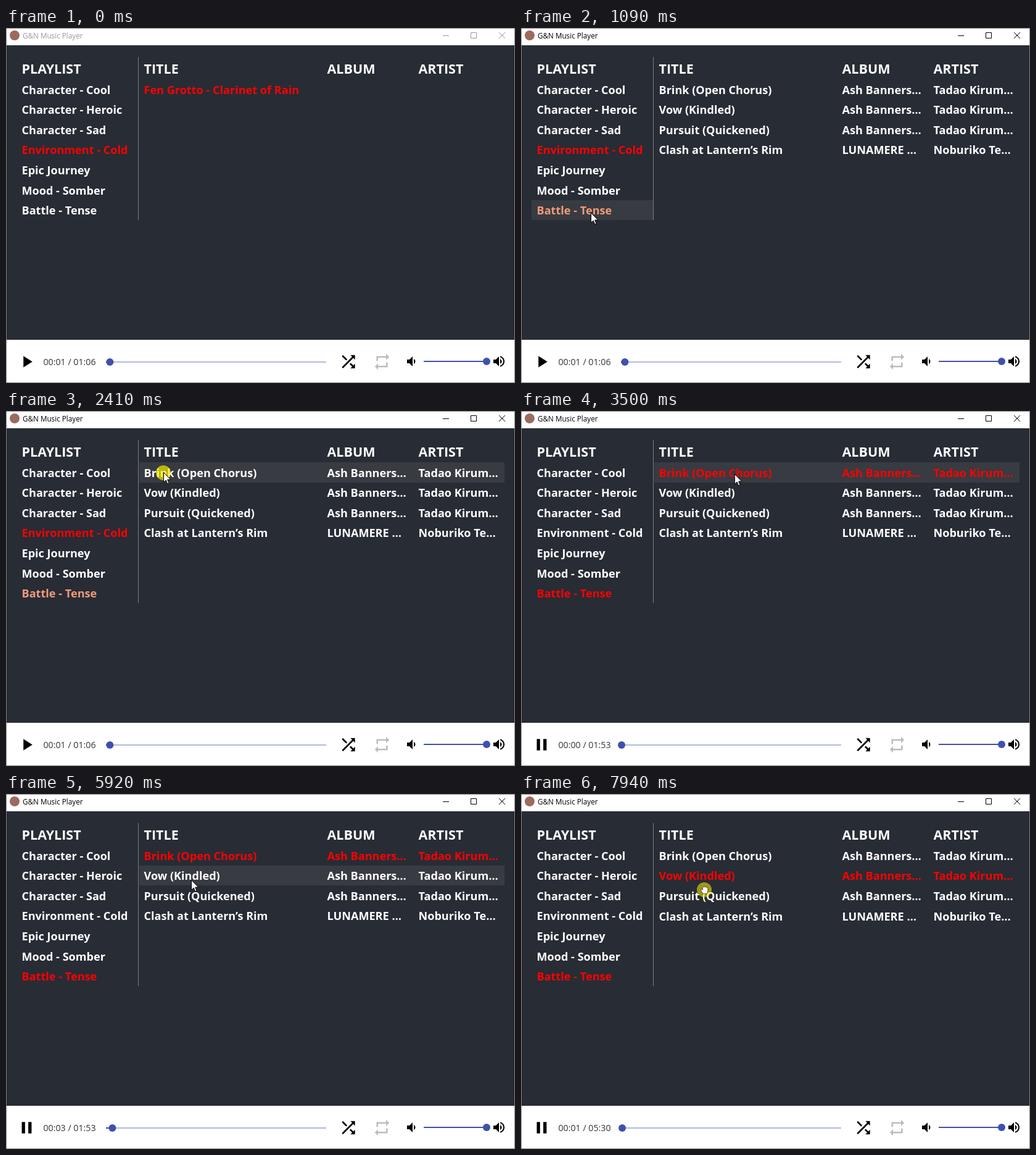
These frames come from a looping animation (825x575 px, 8000 ms). An HTML page with a canvas:

```html
<!DOCTYPE html>
<html lang="en">
<head>
<meta charset="utf-8">
<title>Music Player</title>
<style>
  html, body { margin: 0; width: 100%; height: 100%; overflow: hidden; background: #fff; }
  canvas { display: block; }
</style>
</head>
<body>
<canvas id="stage" width="825" height="575"></canvas>
<script>
const ctx = document.getElementById('stage').getContext('2d');
const LOOP = 8000;
const ACCENT = '#3f50ad';
const FAMILY = '"Open Sans", "Noto Sans", sans-serif';
const ROW_TOP = 83.2, ROW_HEIGHT = 32.6;

// Moments at which the interface changes
const FOCUS = 1010, OPEN_LIST = 1090, PLAY = 2560, NEXT_SONG = 6070, GRAB = 7940;

const playlists = ['Character - Cool', 'Character - Heroic', 'Character - Sad',
  'Environment - Cold', 'Epic Journey', 'Mood - Somber', 'Battle - Tense'];
const coldSongs = [['Fen Grotto - Clarinet of Rain', '', '']];
const battleSongs = [
  ['Brink (Open Chorus)', 'Ash Banners…', 'Tadao Kirum…'],
  ['Vow (Kindled)', 'Ash Banners…', 'Tadao Kirum…'],
  ['Pursuit (Quickened)', 'Ash Banners…', 'Tadao Kirum…'],
  ['Clash at Lantern’s Rim', 'LUNAMERE …', 'Noburiko Te…'],
];
const columns = [223.5, 520.5, 668.5];

// Pointer moves: start, end, number of steps, waypoints
const moves = [
  [170, 930, 11, [[820, 690], [430, 420], [110, 310], [38, 293], [80, 300], [113, 299]]],
  [1940, 2410, 7, [[113, 299], [150, 240], [235, 120], [255, 99]]],
  [3420, 4200, 11, [[255, 99], [380, 103], [640, 110], [755, 150], [762, 205]]],
  [4290, 4370, 2, [[762, 205], [560, 243], [301, 182]]],
  [4450, 4670, 4, [[301, 182], [303, 150], [300, 139]]],
  [6930, 7090, 3, [[300, 139], [301, 157], [303, 178], [302, 190]]],
  [7400, 7780, 6, [[302, 190], [288, 172], [285, 160], [296, 157]]],
  [GRAB, GRAB, 1, [[296, 157], [297, 155]]],
];
const clicks = [[FOCUS, OPEN_LIST], [2410, PLAY], [4910, 4990], [6000, NEXT_SONG], [GRAB, LOOP]];

// Clock updates: time, elapsed seconds, song length
const clock = [[0, 1, 66], [2950, 0, 113], [3930, 1, 113], [4910, 2, 113],
  [5920, 3, 113], [6930, 0, 330], [GRAB, 1, 330]];

const icons = {
  play: 'M8 5v14l11-7z',
  pause: 'M6 19h4V5H6zM14 5v14h4V5z',
  shuffle: 'M10.59 9.17L5.41 4 4 5.41l5.17 5.17zM14.5 4l2.04 2.04L4 18.59 5.41 20 17.96 7.46 20 9.5V4zM14.83 13.41l-1.41 1.41 3.13 3.13L14.5 20H20v-5.5l-2.04 2.04z',
  repeat: 'M7 7h10v3l4-4-4-4v3H5v6h2zM17 17H7v-3l-4 4 4 4v-3h12v-6h-2z',
  quiet: 'M18.5 12c0-1.77-1-3.29-2.5-4.03v8.05c1.5-.73 2.5-2.25 2.5-4.02zM5 9v6h4l5 5V4L9 9z',
  loud: 'M3 9v6h4l5 5V4L7 9zM16.5 12c0-1.77-1-3.29-2.5-4.03v8.05c1.5-.73 2.5-2.25 2.5-4.02zM14 3.23v2.06c2.9.86 5 3.54 5 6.71s-2.1 5.85-5 6.71v2.06c4-.91 7-4.49 7-8.77s-3-7.86-7-8.77z',
};
for (const name in icons) icons[name] = new Path2D(icons[name]);
const arrow = new Path2D('M0 0V16L3.7 12.5 6.2 18.3 8.6 17.3 6.2 11.6H11.3z');
const hand = new Path2D('M-5 2L-6.3-.6-4.6-1.6-3.2 0V-4Q-2.2-6-1-4.4Q0-6.6 1.2-4.6Q2.5-6 3.4-3.9Q5-4.8 5.4-2.6V2L4 6H-2.4z');

function rect(x, y, w, h, color) {
  ctx.fillStyle = color;
  ctx.fillRect(x, y, w, h);
}
function disc(x, y, r, color) {
  ctx.fillStyle = color;
  ctx.beginPath();
  ctx.arc(x, y, r, 0, 7);
  ctx.fill();
}
function text(str, x, y, font, color) {
  ctx.font = `${font} ${FAMILY}`;
  ctx.fillStyle = color;
  ctx.fillText(str, x, y);
}
function icon(name, x, y, scale, color = '#000') {
  ctx.save();
  ctx.translate(x - 12 * scale, y - 12 * scale);
  ctx.scale(scale, scale);
  ctx.fillStyle = color;
  ctx.fill(icons[name]);
  ctx.restore();
}

const rowTop = i => Math.round(ROW_TOP + i * ROW_HEIGHT);
const rowText = (str, x, i, color, shift = 0) =>
  text(str, x, Math.round(106.6 + i * ROW_HEIGHT) + shift, 'bold 18.1px', color);
const lastStarted = (list, t) => list.filter(item => item[0] <= t).pop();

function pointerAt(t) {
  const move = lastStarted(moves, t);
  if (!move) return null;
  const [start, end, steps, points] = move;
  const step = t >= end ? steps : 1 + Math.floor((t - start) / (end - start) * (steps - 1) + 0.01);
  const place = step / steps * (points.length - 1);
  const i = Math.min(Math.floor(place), points.length - 2);
  return [0, 1].map(axis => points[i][axis] + (points[i + 1][axis] - points[i][axis]) * (place - i));
}

function drawTitleBar(active) {
  const ink = active ? '#000' : '#999';
  disc(14, 12, 8, '#9c6a5e');
  text('G&N Music Player', 27, 17, '11.7px', ink);
  ctx.strokeStyle = ink;
  ctx.lineWidth = 1;
  ctx.beginPath();
  ctx.moveTo(708, 12.5);
  ctx.lineTo(718, 12.5);
  ctx.rect(753.5, 7.5, 9, 9);
  ctx.moveTo(799, 7);
  ctx.lineTo(809, 17);
  ctx.moveTo(809, 7);
  ctx.lineTo(799, 17);
  ctx.stroke();
}

function drawHover(pointer, songCount) {
  const [x, y] = pointer;
  const row = Math.floor((y - ROW_TOP) / ROW_HEIGHT);
  if (row < 0) return;
  const top = rowTop(row), height = rowTop(row + 1) - top;
  if (x >= 17 && x < 214 && row < playlists.length) rect(17, top, 197, height, '#383b41');
  if (x >= 216 && x < 808 && row < songCount) rect(216, top, 592, height, '#383b41');
}

function drawLists(t, pointer) {
  const songs = t < OPEN_LIST ? coldSongs : battleSongs;
  rect(1, 28, 823, 477, '#282c34');
  if (pointer && t < GRAB) drawHover(pointer, songs.length);
  rect(214, 47, 1, 264, '#7b7e83');

  ['PLAYLIST', 'TITLE', 'ALBUM', 'ARTIST'].forEach((label, i) =>
    text(label, [25.5, ...columns][i], 74, 'bold 21.5px', '#fff'));

  const playingList = t < PLAY ? 3 : 6;
  playlists.forEach((name, i) => {
    const opened = i === 6 && t >= OPEN_LIST;
    rowText(name, 25.5, i, i === playingList ? '#f00' : opened ? '#f09b7b' : '#fff');
  });

  let playingSong = 0;
  if (t >= OPEN_LIST && t < PLAY) playingSong = -1;
  if (t >= NEXT_SONG) playingSong = 1;
  songs.forEach((song, i) => song.forEach((cell, c) =>
    rowText(cell, columns[c], i, i === playingSong ? '#f00' : '#fff', t >= GRAB && i === 3 ? 1 : 0)));
}

function drawPlayer(t) {
  const [, elapsed, length] = lastStarted(clock, t);
  const two = n => String(n).padStart(2, '0');
  const time = s => `${two(Math.floor(s / 60))}:${two(s % 60)}`;
  const knob = 163 + 355 * elapsed / length;

  icon(t < PLAY ? 'play' : 'pause', 33.5, 540.5, 1.32);
  text(`${time(elapsed)} / ${time(length)}`, 60.5, 546, '14.2px', '#333');
  rect(162, 540, 357, 2, '#b3badf');
  rect(162, 540, knob - 162, 2, ACCENT);
  disc(knob, 541, 6, ACCENT);

  icon('shuffle', 555, 540.5, 1.33);
  icon('repeat', 609.5, 540.5, 1.3, '#bdbdbd');
  icon('quiet', 657, 540, 1);
  rect(677, 539, 102, 2, ACCENT);
  disc(779, 540, 6, ACCENT);
  icon('loud', 799, 540, 1);
}

function drawPointer(t, [x, y]) {
  const grabbing = t >= GRAB;
  if (clicks.some(([from, to]) => t >= from && t < to)) {
    disc(x, y + (grabbing ? 0 : 1), 12, `rgba(255, 240, 0, ${grabbing ? 0.55 : 0.67})`);
  }
  const shape = grabbing ? hand : arrow;
  ctx.save();
  ctx.translate(x + 0.5, y + 0.5);
  ctx.strokeStyle = '#000';
  ctx.lineWidth = grabbing ? 0.6 : 1;
  ctx.fillStyle = '#fff';
  ctx.fill(shape);
  ctx.stroke(shape);
  ctx.restore();
}

function draw(t) {
  const pointer = pointerAt(t);
  rect(0, 0, 825, 575, '#fff');
  drawTitleBar(t >= FOCUS);
  drawLists(t, pointer);
  drawPlayer(t);
  ctx.strokeStyle = '#858585';
  ctx.lineWidth = 1;
  ctx.strokeRect(0.5, 0.5, 824, 574);
  if (pointer) drawPointer(t, pointer);
}

const begin = performance.now();
function frame() {
  draw((performance.now() - begin) % LOOP);
  requestAnimationFrame(frame);
}
frame();
</script>
</body>
</html>
```
